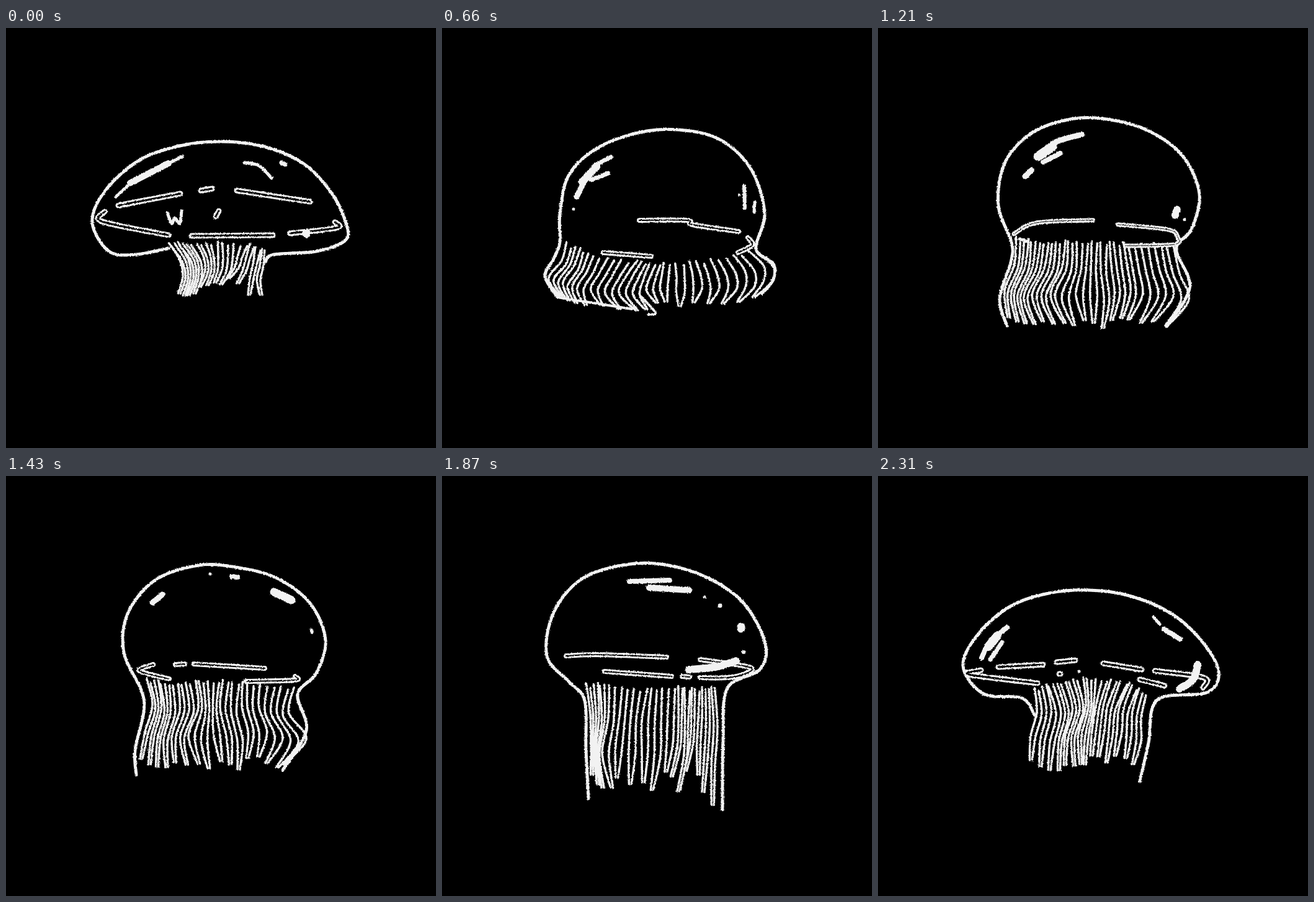
Recreate the animation shown at these times as an HTML page. Size 693x677 px, loop 2420 ms.

```html
<!DOCTYPE html>
<html lang="en">
<head>
<meta charset="utf-8">
<title>Jellyfish</title>
<style>
html, body { margin: 0; width: 100%; height: 100%; overflow: hidden; background: #000; }
svg { display: block; width: 100%; height: 100%; }
path { fill: none; stroke: #f2f2f2; stroke-linecap: round; stroke-linejoin: round; }
.gap { stroke: #000; }
</style>
</head>
<body>
<svg viewBox="0 0 693 677">
  <filter id="chalk" filterUnits="userSpaceOnUse" x="0" y="0" width="693" height="677" color-interpolation-filters="sRGB">
    <feTurbulence id="grain" type="fractalNoise" baseFrequency=".4" numOctaves="2"/>
    <feDisplacementMap in="SourceGraphic" scale="3.2" xChannelSelector="R" yChannelSelector="G"/>
  </filter>
  <g filter="url(#chalk)">
    <path id="strands" stroke-width="3.5"/>
    <path id="bell" stroke-width="5"/>
    <g id="marks"></g>
  </g>
</svg>
<script>
const STEP = 110, STEPS = 22;
const keys = [];
const $ = id => document.getElementById(id);
const nums = text => text.trim().split(/\s+/).map(Number);
const rows = text => text.split('|').map(nums);
const pairs = list => Array.from({ length: list.length / 2 }, (_, i) => list.slice(i * 2, i * 2 + 2));
const mix = (a, b, t) => a.map((v, i) => v + (b[i] - v) * t);
const rand = n => { const r = Math.sin(n * 91.7 + 4.1) * 4375.5; return r - Math.floor(r) - 0.5; };

// bell: outline from left foot to right foot
// fringe: guide strands as x0 y0 x1 x2 x3 y3, the rest lie between them
// slits: hollow strokes; dabs: solid strokes, width first
function key(step, count, rough, gap, bell, fringe, slits, dabs, sway = [0, 0]) {
  keys.push({
    step, count, rough, gap, sway,
    bell: pairs(nums(bell)), fringe: rows(fringe), slits: rows(slits), dabs: rows(dabs)
  });
}

key(0, 24, 8, 6,
  '262 355 210 365 166 360 139 313 160 262 215 213 280 190 345 183 415 191 480 219 526 268 549 318 546 343 500 360 432 365 418 376',
  '262 350 280 285 277 434|288 346 307 309 298 425|335 347 338 338 330 406|390 349 383 377 362 408|418 360 415 410 416 438',
  '181 286 281 267|372 262 490 280|314 262 332 259|338 304 343 295|299 335 430 334|458 331 533 322 530 313|159 296 155 312 262 334',
  '5 177 272 205 246|10 200 250 262 218|5 255 222 284 207|5 384 217 408 222 428 242|7 444 217 450 220|14 484 331|5 260 298 267 315 272 306 280 315 283 295',
  [10, 0]);

key(3, 22, 4, 6,
  '246 403 215 394 166 384 147 342 169 280 192 236 240 188 310 160 362 156 440 180 495 224 526 290 540 358 529 383 470 392 405 398',
  '242 398 250 256 268 405|284 377 292 297 300 411|325 372 325 325 322 411|368 376 364 358 346 410|405 392 400 394 390 403',
  '263 333 175 345 185 361 212 361|235 364 262 363|404 330 454 328|409 371 490 371 502 362 507 368',
  '9 191 272 235 215|15 205 250 240 210|8 240 207 272 195|8 235 235 262 223|4 390 212 400 234 408 212 418 230 425 210|5 402 190 425 207 455 255|16 466 222 481 244|10 495 268 500 274');

key(6, 32, 6, 5,
  '186 434 166 400 180 372 190 345 190 300 205 236 255 191 330 166 400 166 455 184 500 231 520 300 506 356 534 380 534 405 516 428',
  '200 349 193 172 188 436|244 366 234 219 226 442|318 378 300 290 312 452|362 381 360 358 362 443|430 376 440 444 432 448|506 360 534 532 510 434',
  '318 310 395 310 404 317 478 328|260 362 337 368|477 362 500 350 493 338',
  '9 217 272 235 236|12 226 248 250 222|7 245 222 272 208|7 240 245 268 234|5 212 292|4 479 269|6 487 255 488 290|5 504 281 503 297|4 186 434 306 453|4 322 434 344 459 333 462');

key(9, 34, 8, 4,
  '206 478 184 432 207 372 212 345 198 288 212 215 255 171 315 149 375 148 440 169 493 209 521 270 510 332 491 360 521 425 485 488',
  '218 352 204 184 200 480|266 355 250 222 250 482|313 358 300 280 306 486|367 361 370 370 358 490|412 362 430 430 408 480|491 358 516 518 488 488',
  '223 332 260 314 350 310|390 317 470 325 486 337 480 349 402 351',
  '9 268 206 290 185 332 173|15 262 208 285 192|8 270 217 297 203|9 241 240 251 230|5 232 340 244 344|12 482 302 485 293|5 497 309');

key(13, 31, 12, 5,
  '210 482 208 442 222 380 218 345 190 285 196 222 240 168 310 144 370 147 435 164 490 205 515 265 500 318 470 352 484 410 446 474',
  '226 329 236 224 214 464|262 335 265 254 252 462|304 332 310 294 304 456|350 331 345 355 358 470|398 335 398 408 400 460|464 344 456 484 452 468',
  '237 304 215 314 263 327|273 304 288 303|303 303 417 310|387 331 465 329 466 323',
  '9 236 204 252 191|8 364 162 373 163|5 329 158|13 432 187 460 200|5 492 248 493 252',
  [0, -11]);

key(17, 30, 26, 5,
  '236 520 232 440 230 362 205 332 169 290 180 220 225 166 295 143 360 143 430 165 487 206 521 270 512 312 460 342 453 425 452 538',
  '232 338 239 240 238 500|266 335 266 256 262 486|326 346 318 318 312 478|378 340 378 376 364 494|410 345 408 406 398 492|438 340 444 440 444 525',
  '200 290 250 288 362 292|262 315 370 323|387 323 399 324|416 296 498 309 470 324 416 325',
  '8 302 170 367 168|10 334 180 398 184|12 398 312 440 308 474 298|5 423 195|7 448 209|13 482 243 482 246|6 486 284');

key(21, 28, 10, 6,
  '252 385 232 358 170 351 137 306 162 254 215 209 275 189 340 184 405 193 470 220 520 264 549 315 530 349 450 361 436 430 422 492',
  '252 345 256 246 242 464|284 334 298 288 282 470|320 327 330 316 318 460|362 328 352 346 340 456|404 334 386 382 376 456|430 352 424 424 416 466',
  '194 308 266 304|288 300 318 297|363 302 425 312|422 328 462 338|166 313 147 320 257 334|446 314 525 325 524 341|292 319 294 319',
  '8 167 293 180 268 208 244|14 178 275 192 258|7 181 296 200 268|12 486 343 508 328 515 304|8 461 247 487 263|5 444 227 454 239|5 324 315');

// smooth curve through points
function curve(pts) {
  const at = i => pts[Math.max(0, Math.min(pts.length - 1, i))];
  let d = 'M' + pts[0];
  if (pts.length < 2) return d + 'h.01';
  for (let i = 0; i < pts.length - 1; i++) {
    const [a, b, c, e] = [at(i - 1), at(i), at(i + 1), at(i + 2)];
    const p = b.map((v, j) => v + (c[j] - a[j]) / 6);
    const q = c.map((v, j) => v - (e[j] - b[j]) / 6);
    d += `C${p} ${q} ${c}`;
  }
  return d;
}

function resample(list, u) {
  const p = u * (list.length - 1), i = Math.min(list.length - 2, Math.floor(p));
  return mix(list[i], list[i + 1], p - i);
}

// neighbouring strands share a tip, so each pair reads as one tentacle
function strand(j, count, rough, guide) {
  const pair = j >> 1, side = j % 2 * 2 - 1;
  const tipAt = Math.min(1, (pair * 2 + 0.5) / (count - 1));
  const [x0, y0, x1, x2] = guide(j / (count - 1));
  const [, , , , tx, ty] = guide(tipAt);
  const x3 = tx + side * 2 + rand(pair) * rough * 0.5;
  const y3 = ty + rand(pair + 50) * rough * 1.6;
  const top = y0 + rand(j + 20) * 8, h = (y3 - top) / 3;
  return curve([[x0 + rand(j) * 4, top], [x1, top + h], [x2, top + h * 2], [x3, y3]]);
}

// box of the dome, without its feet
function box(bell) {
  const dome = bell.slice(3, 13), xs = dome.map(p => p[0]), ys = dome.map(p => p[1]);
  const x = Math.min(...xs), y = Math.min(...ys);
  return { x, y, w: Math.max(...xs) - x, h: Math.max(...ys) - y };
}

function draw(step) {
  let i = keys.length - 1;
  while (keys[i].step > step) i--;
  const a = keys[i], b = keys[(i + 1) % keys.length];
  const t = (step - a.step) / ((b.step || STEPS) - a.step);
  const near = t > 0.5 ? b : a;
  const [dx, dy] = a.sway.map(v => v * Math.sin(Math.PI * t));

  const bell = a.bell.map((p, j) => mix(p, b.bell[j], t)).map(([x, y]) => [x + dx, y + dy]);
  const guide = u => mix(resample(a.fringe, u), resample(b.fringe, u), t)
    .map((v, n) => v + (n === 1 || n === 5 ? dy : dx));
  const strands = Array.from({ length: near.count }, (_, j) => strand(j, near.count, near.rough, guide));
  $('bell').setAttribute('d', curve(bell));
  $('strands').setAttribute('d', strands.join(''));

  const from = box(near.bell), to = box(bell);
  const place = ([x, y]) => [to.x + (x - from.x) * to.w / from.w, to.y + (y - from.y) * to.h / from.h];
  const stroke = (list, w, name = '') =>
    `<path class="${name}" d="${curve(pairs(list).map(place))}" stroke-width="${w}"/>`;
  const slits = near.slits.map(s => stroke(s, near.gap + 3) + stroke(s, near.gap - 3, 'gap'));
  const dabs = near.dabs.map(([w, ...pts]) => stroke(pts, w));
  $('marks').innerHTML = slits.join('') + dabs.join('');
  $('grain').setAttribute('seed', step + 1);
}

let shown = -1;
function tick() {
  const step = Math.floor(performance.now() / STEP) % STEPS;
  if (step !== shown) draw(shown = step);
  requestAnimationFrame(tick);
}
tick();
</script>
</body>
</html>
```
